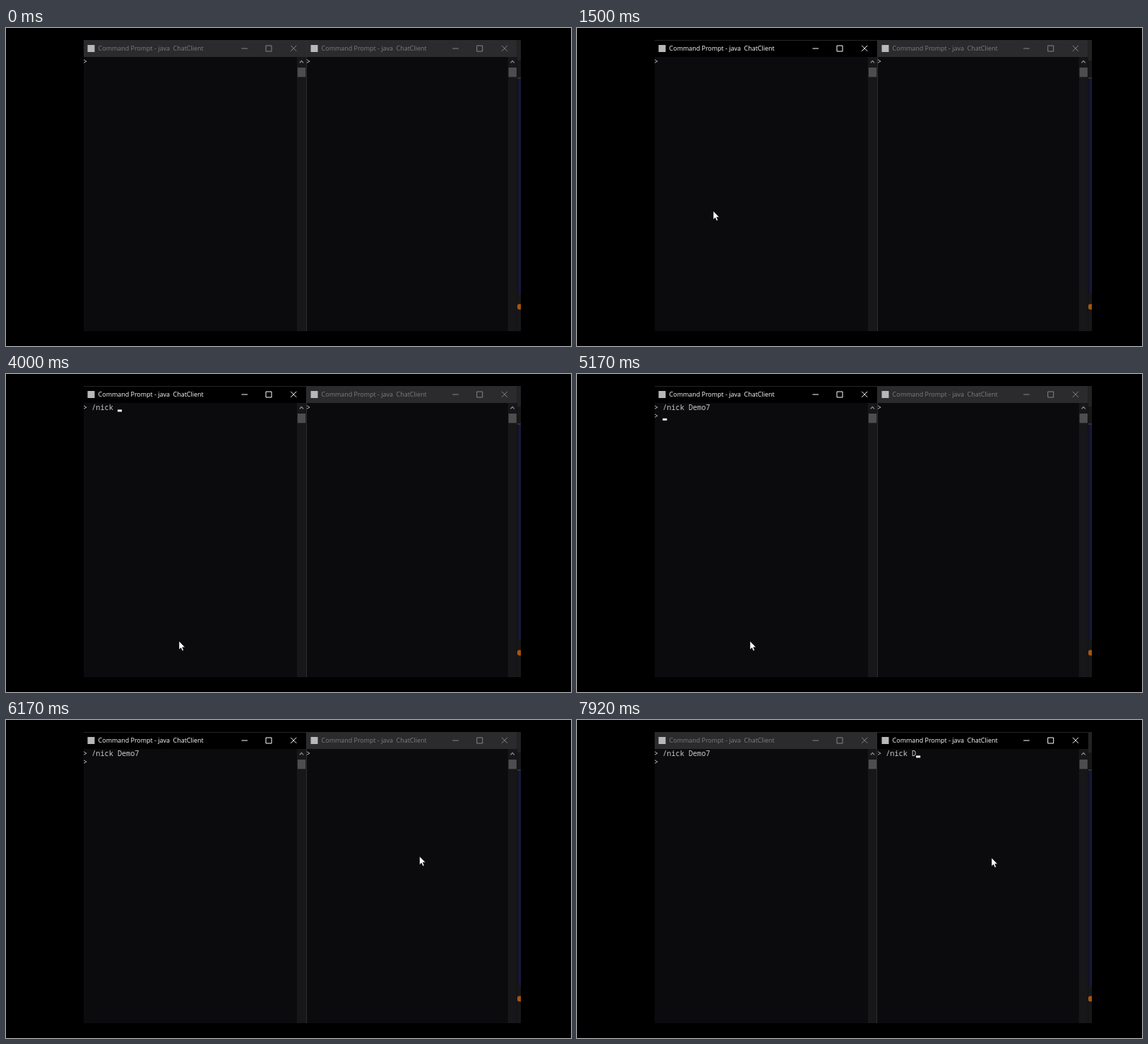
These frames come from a looping animation (800 px wide and 450 px high, 8 s). An HTML page:

```html
<!DOCTYPE html>
<html lang="en">
<head>
<meta charset="utf-8">
<title>Chat client</title>
<style>
  html, body { margin: 0; width: 100%; height: 100%; overflow: hidden; background: #000; }
  svg { display: block; width: 100vw; height: 100vh; }
  text { white-space: pre; }
  .title { font: 8.95px "Open Sans", "Noto Sans", sans-serif; }
  .mono { font: 10.2px "Noto Sans Mono", "DejaVu Sans Mono", monospace; fill: #ccc; }
</style>
</head>
<body>
<svg id="stage" viewBox="0 0 800 450">
  <defs>
    <clipPath id="screen"><rect x="110" y="17" width="619" height="412"/></clipPath>
    <linearGradient id="edge" x1="0" x2="1">
      <stop offset="0" stop-color="#101024"/>
      <stop offset="1" stop-color="#1c1c40"/>
    </linearGradient>
  </defs>
</svg>
<script>
const LOOP = 8000;
const FPS = 12;
const CELL = 6.12;
const LINE = 12.4;
const NAME = "Demo7";
const stage = document.getElementById("stage");

function add(parent, tag, attrs, content) {
  const el = document.createElementNS("http://www.w3.org/2000/svg", tag);
  for (const key in attrs) el.setAttribute(key, attrs[key]);
  if (content) el.textContent = content;
  parent.appendChild(el);
  return el;
}

const rect = (parent, x, y, width, height, fill) =>
  add(parent, "rect", { x, y, width, height, fill });

const screen = add(stage, "g", { "clip-path": "url(#screen)" });

// Sliver of the desktop to the right of the windows
rect(screen, 723, 17, 6, 412, "#17171a");
rect(screen, 724, 17, 5, 29, "#232326");
rect(screen, 724, 70, 5, 1.5, "#3a3a42");
rect(screen, 724, 72, 5, 304, "url(#edge)");
add(screen, "circle", { cx: 727.5, cy: 394.5, r: 4, fill: "#a3550f" });

function makeWindow(left, right, dx) {
  const g = add(screen, "g", {});
  rect(g, left, 17, right - left, 412, "#0b0a0d");
  const bar = rect(g, left, 17, right - left, 24, "#000");
  const topLine = rect(g, left, 17, right - left, 0.8, "#303033");
  rect(g, 115.5 + dx, 24, 10, 10, "#b8b8b8");
  const title = add(g, "text", { x: 130.6 + dx, y: 32.4, class: "title" },
    "Command Prompt - java  ChatClient");

  const buttons = add(g, "path", {
    d: `M${right - 91.5} 29h8.5 M${right - 57} 25h8v8h-8z M${right - 21.8} 24.8l8 8m0-8l-8 8`,
    fill: "none", "stroke-width": 1
  });

  rect(g, right - 13, 41, 13, 388, "#171619");
  add(g, "path", {
    d: `M${right - 9.3} 49.4l2.7-2.9l2.7 2.9`,
    fill: "none", stroke: "#8c8c8c", "stroke-width": 1.3
  });
  rect(g, right - 12.2, 56, 11.4, 13.3, "#4d4d4f");

  const border = rect(g, 0, 17, 1, 412, "#2e2e31");
  const rows = [0, 1].map(i =>
    add(g, "text", { x: 109 + dx, y: 51 + i * LINE, class: "mono" }));
  const caret = rect(g, 0, 0, CELL, 3, "#f2f2f2");

  return (active, lines, caretOn) => {
    bar.setAttribute("fill", active ? "#000" : "#2b2a2d");
    topLine.setAttribute("opacity", active ? 1 : 0);
    title.setAttribute("fill", active ? "#fff" : "#7d7d7f");
    buttons.setAttribute("stroke", active ? "#fff" : "#858587");
    border.setAttribute("x", dx ? (active ? 424 : 425) : 425);
    rows.forEach((row, i) => { row.textContent = lines[i] || ""; });
    const last = lines.length - 1;
    caret.setAttribute("x", 109 + dx + lines[last].length * CELL);
    caret.setAttribute("y", 50.4 + last * LINE);
    caret.setAttribute("opacity", caretOn ? 1 : 0);
  };
}

const drawLeft = makeWindow(110, 425, 0);
const drawRight = makeWindow(425, 723.7, 316);

const pointer = add(screen, "path", {
  d: "M0 0V12L2.7 9.4L4.6 13.8L6.5 13L4.7 8.7H8.4Z",
  fill: "#fff", stroke: "#000", "stroke-width": 0.5
});

// Each entry: time, number of characters typed
const COMMAND = "/nick " + NAME;
const leftKeys = [[2670, 1], [3170, 3], [3420, 4], [3670, 6], [4170, 7], [4420, 8], [4670, 9], [4920, 11]];
const rightKeys = [[7000, 1], [7250, 3], [7500, 4], [7580, 5], [7750, 6], [7920, 7]];
const ENTER = 5170;

const leftCaret = [[1670, 2170], [3170, 5670]];
const rightCaret = [[7000, LOOP]];

// Each entry: time, x, y of the pointer tip
const path = [
  [80, 610, 352], [170, 470, 372], [250, 425, 377], [667, 425, 377],
  [1330, 193, 259], [1500, 193, 259], [2000, 245, 378], [5590, 245, 378],
  [6080, 585, 192], [6330, 587, 195], [LOOP, 587, 195]
];

const typed = (keys, t) =>
  COMMAND.slice(0, keys.reduce((n, [at, count]) => t >= at ? count : n, 0));
const within = (spans, t) => spans.some(([from, to]) => t >= from && t < to);

function pointerAt(t) {
  const i = path.findIndex(([at]) => at > t);
  const [t0, x0, y0] = path[i - 1];
  const [t1, x1, y1] = path[i];
  const u = (t - t0) / (t1 - t0);
  const e = u * u * (3 - 2 * u);
  return [x0 + (x1 - x0) * e, y0 + (y1 - y0) * e];
}

function draw(ms) {
  const step = Math.floor((ms % LOOP + 4) * FPS / 1000) % (LOOP * FPS / 1000);
  const t = Math.round(step * 100 / FPS) * 10;

  const lines = ["> " + typed(leftKeys, t)];
  if (t >= ENTER) lines.push("> ");
  drawLeft(t >= 1330 && t < 6330, lines, within(leftCaret, t));
  drawRight(t >= 6330, ["> " + typed(rightKeys, t)], within(rightCaret, t));

  const shown = t >= 80;
  pointer.setAttribute("visibility", shown ? "visible" : "hidden");
  if (shown) pointer.setAttribute("transform", `translate(${pointerAt(t)})`);
}

const start = performance.now();
function tick() {
  draw(performance.now() - start);
  requestAnimationFrame(tick);
}
draw(0);
requestAnimationFrame(tick);
</script>
</body>
</html>
```
